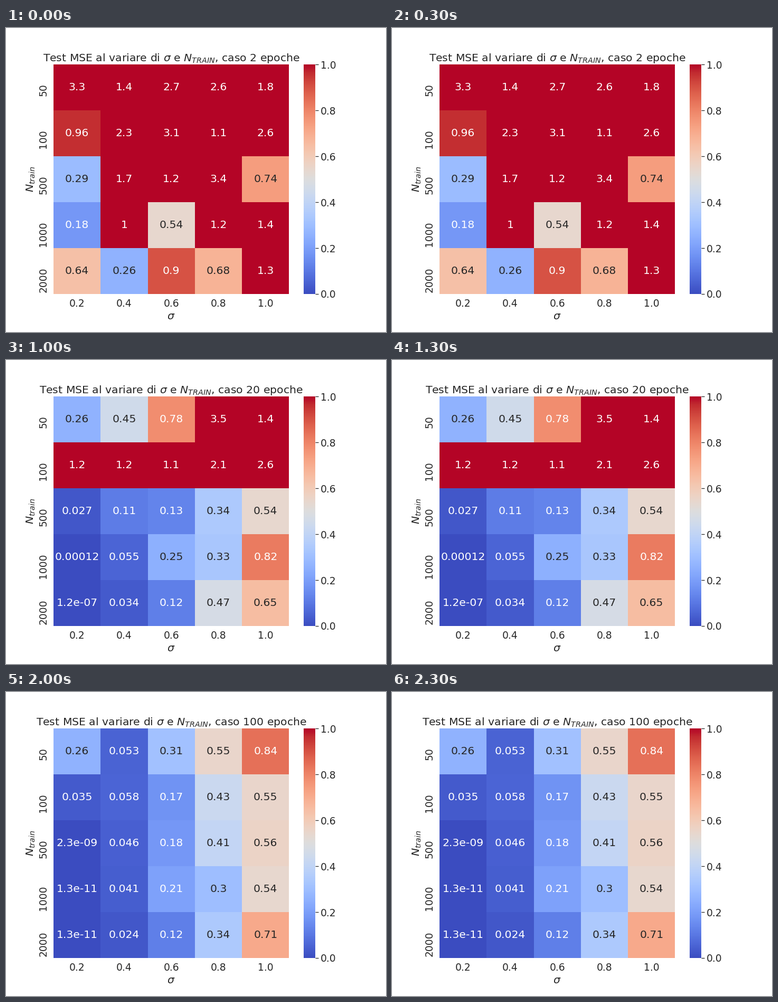
Recreate the animation shown at these times as a matplotlib script. Size 720 px wide and 576 px high, loop 2500 ms.

```python
import numpy as np
import matplotlib.pyplot as plt
from matplotlib.animation import FuncAnimation

INK = "0.15"
SCALE = 1.7
SIGMAS = [0.2, 0.4, 0.6, 0.8, 1.0]
SIZES = [50, 100, 500, 1000, 2000]

# Test error per epoch count: one line per training size, one column per sigma
RUNS = {
    2: """3.3 1.4 2.7 2.6 1.8
          0.96 2.3 3.1 1.1 2.6
          0.29 1.7 1.2 3.4 0.74
          0.18 1.0 0.54 1.2 1.4
          0.64 0.26 0.9 0.68 1.3""",
    10: """2.0 0.72 2.5 2.2 2.1
           1.0 1.9 0.99 2.2 4.3
           0.066 0.48 0.57 0.87 0.89
           0.042 0.098 0.15 0.3 0.48
           0.00053 0.039 0.19 0.36 0.61""",
    20: """0.26 0.45 0.78 3.5 1.4
           1.2 1.2 1.1 2.1 2.6
           0.027 0.11 0.13 0.34 0.54
           0.00012 0.055 0.25 0.33 0.82
           1.2e-07 0.034 0.12 0.47 0.65""",
    50: """0.44 0.16 1.2 0.68 1.1
           0.048 0.056 0.45 0.76 0.9
           2.2e-05 0.034 0.15 0.37 0.64
           5.9e-11 0.051 0.1 0.39 0.59
           1.6e-11 0.043 0.2 0.33 0.74""",
    100: """0.26 0.053 0.31 0.55 0.84
            0.035 0.058 0.17 0.43 0.55
            2.3e-09 0.046 0.18 0.41 0.56
            1.3e-11 0.041 0.21 0.3 0.54
            1.3e-11 0.024 0.12 0.34 0.71""",
}
EPOCHS = list(RUNS)
GRIDS = [np.array(t.split(), float).reshape(5, 5) for t in RUNS.values()]

plt.rcParams.update({
    "font.family": "DejaVu Sans",
    "font.size": 12 * SCALE,
    "axes.titlesize": 12 * SCALE,
    "axes.labelsize": 12 * SCALE,
    "xtick.labelsize": 11 * SCALE,
    "ytick.labelsize": 11 * SCALE,
    "text.color": INK,
    "axes.labelcolor": INK,
    "xtick.color": INK,
    "ytick.color": INK,
    "figure.subplot.bottom": 0.125,
})


def luminance(rgb):
    rgb = np.asarray(rgb)
    lin = np.where(rgb <= 0.03928, rgb / 12.92, ((rgb + 0.055) / 1.055) ** 2.4)
    return lin @ [0.2126, 0.7152, 0.0722]


fig, ax = plt.subplots(figsize=(10, 8), dpi=72, facecolor="white")
mesh = ax.pcolormesh(GRIDS[0], cmap="coolwarm", vmin=0, vmax=1)
ax.set(xlim=(0, 5), ylim=(5, 0), xlabel=r"$\sigma$", ylabel=r"$N_{train}$")
ax.spines[:].set_visible(False)
mids = np.arange(5) + 0.5
ax.set_xticks(mids, SIGMAS)
ax.set_yticks(mids, SIZES, rotation="vertical")
ax.tick_params(length=6, left=False, bottom=False)

bar = fig.colorbar(mesh, ax=ax, ticks=np.linspace(0, 1, 6))
bar.outline.set_visible(False)
bar.ax.tick_params(length=6, width=1.25)

title = ax.set_title("")
cells = [ax.text(x, y, "", ha="center", va="center") for y in mids for x in mids]


def draw(i):
    grid = GRIDS[i]
    mesh.set_array(grid)
    title.set_text(r"Test MSE al variare di $\sigma$ e $N_{TRAIN}$, "
                   f"caso {EPOCHS[i]} epoche")
    for cell, value in zip(cells, grid.flat):
        cell.set_text(f"{value:.2g}")
        light = luminance(mesh.to_rgba(value)[:3]) > 0.408
        cell.set_color(INK if light else "white")
    return [mesh, title, *cells]


anim = FuncAnimation(fig, draw, frames=len(GRIDS), init_func=lambda: draw(0),
                     interval=500, repeat=True, repeat_delay=0)
plt.show()
```
